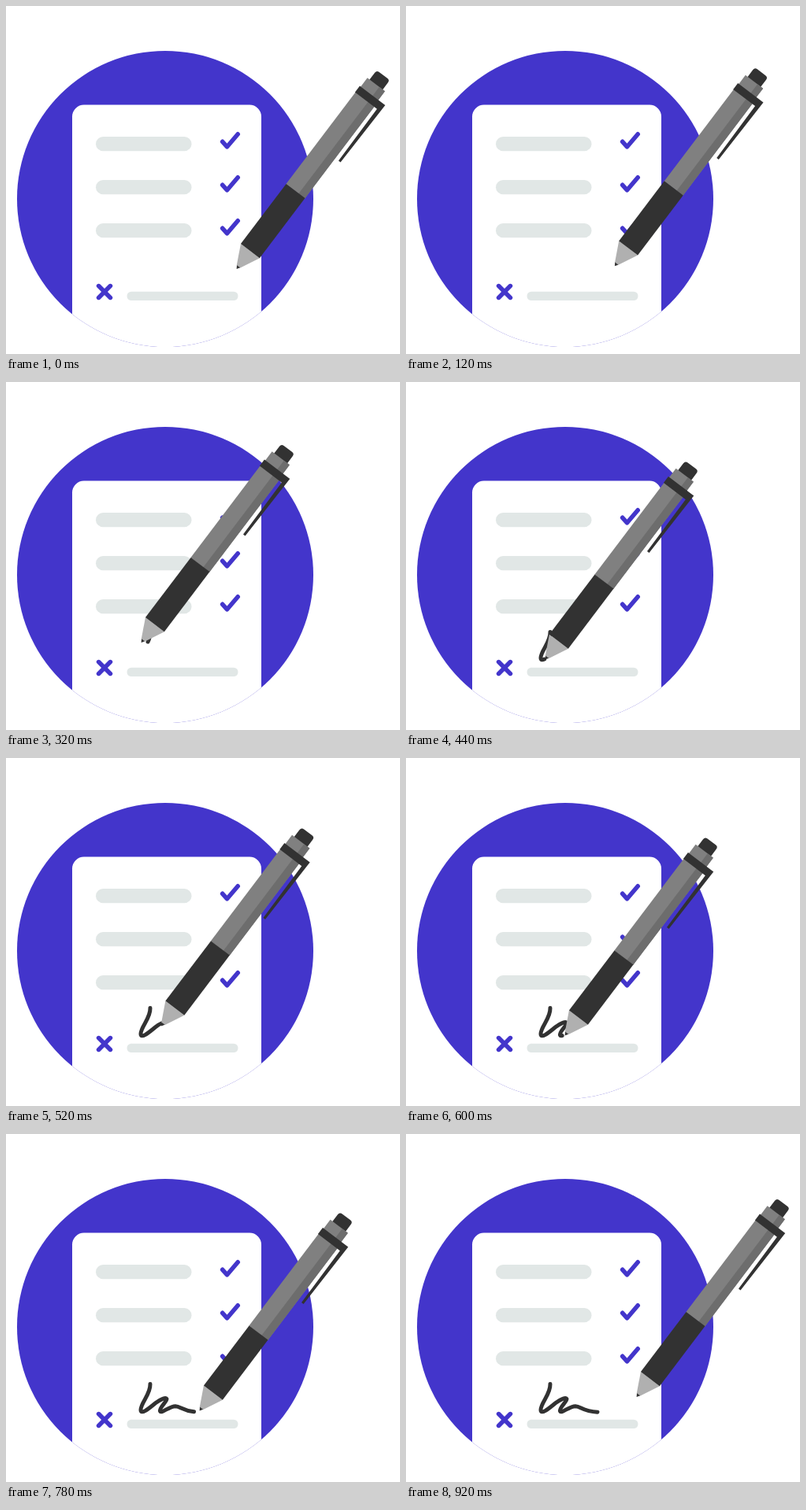
An HTML page that plays this animation: 500 px wide and 442 px high, repeating every 1.02 s.

```html
<!DOCTYPE html>
<html lang="en">
<head>
<meta charset="utf-8">
<title>Checklist and pen</title>
<style>
  html, body { margin: 0; width: 100%; height: 100%; overflow: hidden; background: #fff; }
  svg { display: block; width: 100%; height: 100%; }
  .mark { fill: none; stroke: #4335cb; stroke-width: 5.6; stroke-linecap: round; stroke-linejoin: round; }
  .ink { fill: none; stroke: #323232; stroke-width: 5; stroke-linecap: round; stroke-linejoin: round; }
</style>
</head>
<body>
<svg viewBox="0 0 500 442">
  <defs>
    <clipPath id="disc"><circle cx="202" cy="245" r="188"/></clipPath>
    <g id="row">
      <rect x="114" y="166" width="121.5" height="18.3" rx="9.15" fill="#e1e7e6"/>
      <path class="mark" d="M274.7 172.3L280.6 178.8L294.2 162.8"/>
    </g>
  </defs>

  <circle cx="202" cy="245" r="188" fill="#4335cb"/>
  <g clip-path="url(#disc)">
    <rect x="84" y="125.5" width="240" height="330" rx="15" fill="#fff"/>
  </g>
  <use href="#row"/>
  <use href="#row" y="55"/>
  <use href="#row" y="110"/>
  <path class="mark" d="M117.6 355.6L132.4 370.4M132.4 355.6L117.6 370.4"/>
  <rect x="153.5" y="362.7" width="141" height="11.4" rx="5.7" fill="#e1e7e6"/>

  <path id="ink" class="ink" pathLength="100" d="M183 317.5C183.5 331 171 341 171 350.5C171.5 357.5 183 347 190 341.5C196 337 203 334 204 336.5C205 339 194 348 195.5 352C197 355.5 207 346 215 345.7C222 346 224 352 243 353.2"/>

  <g id="pen">
    <!-- Upright pen with its point at the origin -->
    <g transform="translate(293 333.5) rotate(37.1)">
      <path d="M-15 -28L-2.6 -3H2.6L15 -28Z" fill="#b0b0b0"/>
      <path d="M-2.6 -3.4L0 0.6L2.6 -3.4Z" fill="#323232"/>
      <path d="M-10.5 -292V-304Q-10.5 -308 -6.5 -308H6.5Q10.5 -308 10.5 -304V-292Z" fill="#323232"/>
      <rect x="-14" y="-293" width="28" height="15" fill="#808080"/>
      <rect x="5" y="-293" width="9" height="15" fill="#6d6d6d"/>
      <rect x="-15" y="-270" width="30" height="147" fill="#808080"/>
      <rect x="5" y="-270" width="10" height="147" fill="#6d6d6d"/>
      <rect x="-15" y="-123.5" width="30" height="95.5" fill="#323232"/>
      <path d="M-15.5 -279H25L23.5 -187H20.3L19.5 -269H-15.5Z" fill="#323232"/>
    </g>
  </g>
</svg>
<script>
  const LOOP = 1020, STEP = 20;

  // time, pen x, pen y, percent of line drawn
  const keys = [
    [80, 0, 0, 0],
    [240, -111, -14.5, 0],
    [320, -121, -3, 9],
    [385, -122, 13, 20],
    [440, -116, 18.5, 29],
    [530, -93, 5, 50],
    [600, -91, 18.5, 67],
    [660, -80, 13, 79],
    [720, -67, 18, 88],
    [780, -47, 17.5, 97],
    [800, -40, 15, 100],
    [920, 0, 0, 100]
  ];

  const pen = document.getElementById("pen");
  const ink = document.getElementById("ink");

  function pose(t) {
    if (t <= keys[0][0]) return keys[0];
    const i = keys.findIndex(k => k[0] >= t);
    if (i < 0) return keys[keys.length - 1];
    const a = keys[i - 1], b = keys[i];
    const u = (t - a[0]) / (b[0] - a[0]);
    return a.map((v, n) => v + (b[n] - v) * u);
  }

  function draw(t) {
    const [, x, y, drawn] = pose(t);
    pen.setAttribute("transform", `translate(${x} ${y})`);
    ink.style.display = drawn > 0 ? "" : "none";
    ink.setAttribute("stroke-dasharray", `${drawn} 200`);
  }

  let start = null;
  function tick(now) {
    if (start === null) start = now;
    const t = (now - start) % LOOP;
    draw(Math.floor(t / STEP) * STEP);
    requestAnimationFrame(tick);
  }

  draw(0);
  requestAnimationFrame(tick);
</script>
</body>
</html>
```
